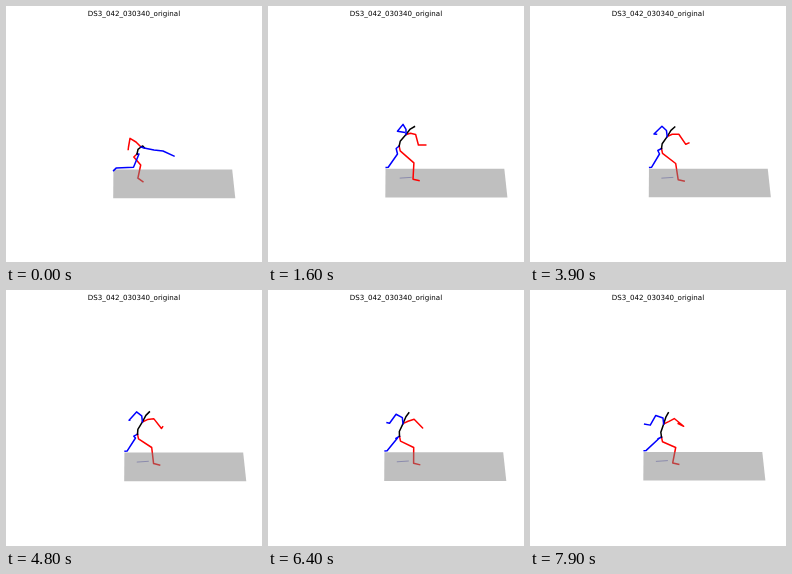
An HTML page that plays this animation: 256 px wide and 256 px high, repeating every 8000 ms.

```html
<!DOCTYPE html>
<html lang="en">
<head>
<meta charset="utf-8">
<title>Motion skeleton</title>
<style>
  html, body { margin: 0; width: 100%; height: 100%; overflow: hidden; background: #fff; }
  svg { display: block; width: 100vw; height: 100vh; }
  text { font: 7.1px "DejaVu Sans", sans-serif; text-anchor: middle; }
  polyline { fill: none; stroke-width: 1.5; stroke-linejoin: round; stroke-linecap: square; }
  #floor { fill: #808080; fill-opacity: .5; }
  #trail { stroke: #7474a4; stroke-width: .7; stroke-linecap: butt; }
  #redLeg, #redArm { stroke: #f00; }
  #blueLeg, #blueArm { stroke: #00f; }
  #spine { stroke: #000; }
</style>
</head>
<body>
<svg viewBox="0 0 256 256">
  <text x="128" y="10.3">DS3_042_030340_original</text>
  <polyline id="redLeg"/>
  <polygon id="floor"/>
  <polyline id="trail"/>
  <polyline id="blueLeg"/>
  <polyline id="redArm"/>
  <polyline id="spine"/>
  <polyline id="blueArm"/>
</svg>
<script>
const LOOP = 8000, STEP = 100;
const RISE_END = 800, STRIDE_END = 2900, SETTLE_END = 7900;
const LEAN = 20 * Math.PI / 180;

const byId = id => document.getElementById(id);
const svg = document.querySelector("svg");
const progress = (t, from, to) => Math.min(Math.max((t - from) / (to - from), 0), 1);
const easeOut = (u, power) => 1 - (1 - u) ** power;
const mix = (a, b, u) => a.map((v, i) => v + (b[i] - v) * u);
const add = (p, x, y) => [p[0] + x, p[1] + y];
const plot = (id, ...points) =>
  byId(id).setAttribute("points", points.flat().map(n => n.toFixed(2)).join(" "));

function draw(t) {
  // The figure rises from a crouch, strides out, then slowly settles upright.
  const rise = easeOut(progress(t, 0, RISE_END), 1.5);
  const stride = easeOut(progress(t, RISE_END, STRIDE_END), 2.4);
  const settle = progress(t, STRIDE_END, SETTLE_END);

  const pose = (crouch, risen, strode = risen) =>
    mix(mix(crouch, risen, rise), strode, stride);

  const pivot = pose([131, 148], [130.5, 139], [131.5, 140.5]);
  const root = add(pivot, 0, 6.5 * Math.sin(settle * Math.PI / 2));

  // The upper body turns about the root as it settles.
  const cos = Math.cos(LEAN * settle), sin = Math.sin(LEAN * settle);
  const turn = ([px, py]) => {
    const x = px - pivot[0], y = py - pivot[1];
    return add(root, x * cos + y * sin, y * cos - x * sin);
  };
  const upper = (...keys) => turn(pose(...keys));
  const from = (joint, ...keys) => add(joint, ...pose(...keys));
  const pullBack = hand => add(hand, -10 * settle, 0);

  const neck = upper([135, 141], [138, 127.5], [138, 129]);
  const head = upper([138.5, 142], [147, 122], [146.2, 120]);
  const throat = add(mix(neck, head, .5), 0, -1.5);
  plot("spine", root, turn(add(pivot, 1, -4.7)), neck, throat, head);

  plot("blueArm", neck,
    from(neck, [3, 1], [1.5, -3], [-.7, -6]),
    upper([148, 144], [138.3, 118.5], [133.5, 118.3]),
    upper([157, 145], [139, 124.5], [125, 125.5]),
    pullBack(upper([168, 150], [151, 127], [129.5, 126])));

  plot("redArm", neck,
    from(neck, [-5, -5], [3.5, 1], [5, -2.3]),
    upper([124, 132.3], [143, 130.5], [149.8, 127.5]),
    upper([122.5, 141], [138.3, 141], [156, 138]),
    pullBack(upper([122.2, 143.5], [150.3, 143], [161.2, 137])));

  const slab = add(pose([107.4, 163.6], [113.9, 163], [119.2, 162.7]),
    -5.7 * settle ** 2, -.8 * settle ** 2);
  plot("floor", slab, add(slab, 118.8, 0), add(slab, 121.9, 28.7), add(slab, -.2, 28.7));

  // Both feet and the trail travel with the slab.
  const blueAnkle = add(slab, 2.7, -1.5);
  plot("blueLeg", root, from(root, [2, 0], [-1.5, 3.5], [-3.7, 2]),
    pose([127.5, 161.3], [129.5, 148]),
    blueAnkle, from(blueAnkle, [-2.5, 2.5], [-2, .2]));

  const redAnkle = from(slab, [24.5, 8.5], [23.8, 9], [29.2, 11]);
  plot("redLeg", root, from(root, [-3.2, 3], [1, 4.8]),
    pose([134.7, 159], [146.3, 155.5], [145.7, 157.5]),
    redAnkle, from(redAnkle, [5, 3.5], [6, 1.4]));

  const trailStart = from(slab, [24, 9], [18, 9], [12.4, 9.5]);
  plot("trail", trailStart, add(trailStart, 12 * rise, -.8));

  const legInFront = stride > .4 && settle < .2;
  svg.insertBefore(byId("redLeg"), byId(legInFront ? "blueLeg" : "floor"));
}

const start = performance.now();
function tick() {
  const t = (performance.now() - start) % LOOP;
  draw(Math.floor(t / STEP) * STEP);
  requestAnimationFrame(tick);
}
tick();
</script>
</body>
</html>
```
